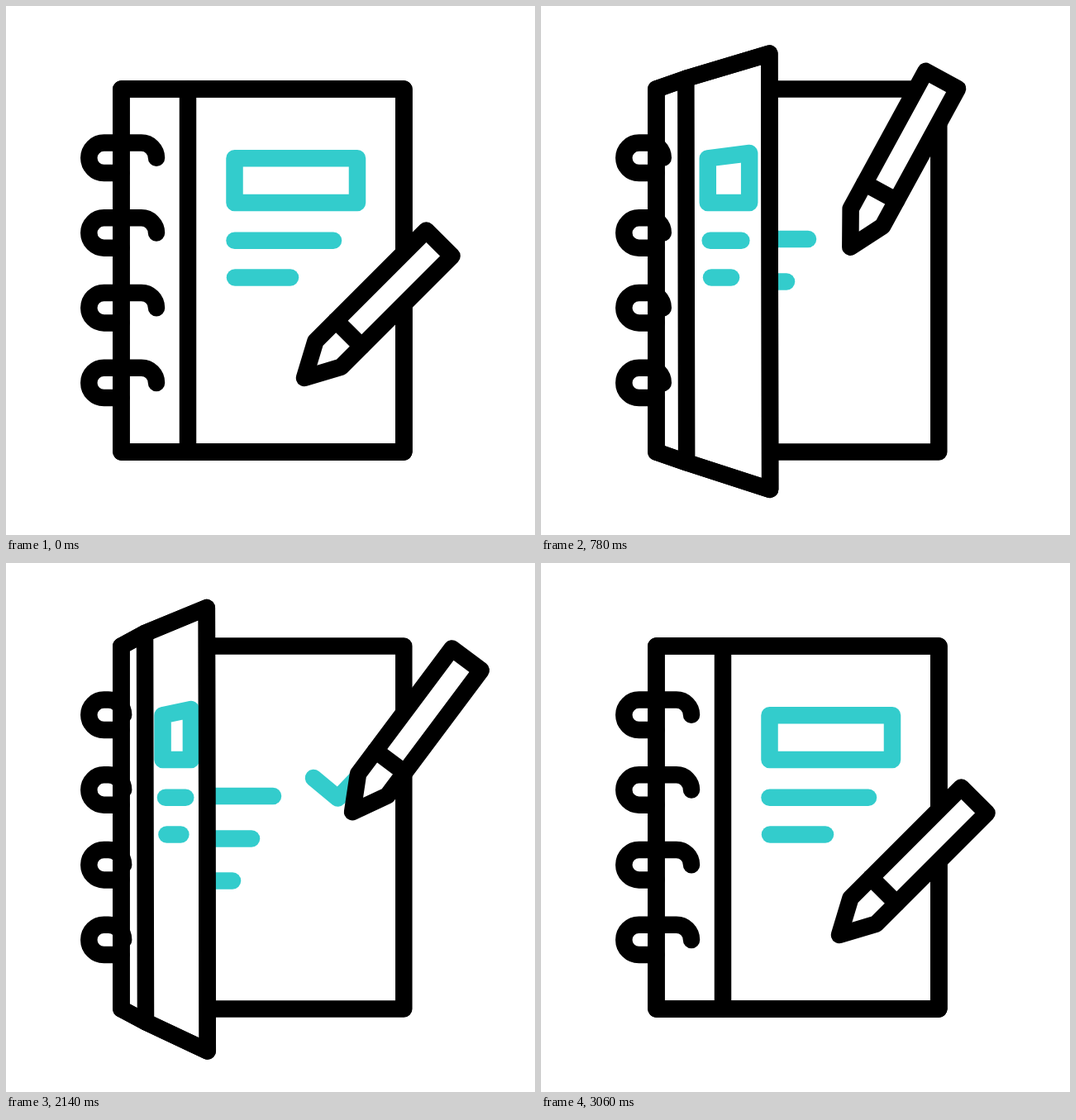
An HTML page with a canvas that plays this animation: 640 by 640 pixels, repeating every 3.6 s.

```html
<!DOCTYPE html>
<html lang="en">
<head>
<meta charset="utf-8">
<title>Notebook</title>
<style>
html, body { margin: 0; width: 100%; height: 100%; overflow: hidden; background: #fff; }
canvas { display: block; width: 100vw; height: 100vh; }
</style>
</head>
<body>
<canvas id="stage" width="640" height="640"></canvas>
<script>
const ctx = document.getElementById('stage').getContext('2d');
const LOOP = 3600, TEAL = '#33cccc', BLACK = '#000';

const lerp = (a, b, k) => a + (b - a) * k;
const mix = (a, b, k) => a.map((v, i) => lerp(v, b[i], k));
const ease = (t, from, to) => {
  const s = Math.min(1, Math.max(0, (t - from) / (to - from)));
  return s * s * (3 - 2 * s);
};

// How far the cover is open: [time, amount], joined by a smooth curve
const OPENING = [
  [213, 0], [540, .493], [740, .79], [1010, 1], [2030, 1],
  [2140, .972], [2360, .81], [2740, .293], [2900, .1], [3040, 0]
];

function slope(keys, i) {
  const a = keys[i - 1], b = keys[i], c = keys[i + 1];
  if (!a || !c || (b[1] - a[1]) * (c[1] - b[1]) <= 0) return 0;
  return (c[1] - a[1]) / (c[0] - a[0]);
}

function follow(keys, t) {
  if (t <= keys[0][0]) return keys[0][1];
  const i = keys.findIndex(k => k[0] > t) - 1;
  if (i < 0) return keys[keys.length - 1][1];
  const [t0, v0] = keys[i], [t1, v1] = keys[i + 1];
  const d = t1 - t0, s = (t - t0) / d, r = 1 - s;
  return v0 * r * r * (1 + 2 * s) + v1 * s * s * (3 - 2 * s)
    + d * s * r * (slope(keys, i) * r - slope(keys, i + 1) * s);
}

// Point list up to fraction k of its length
function trim(points, k) {
  const dist = (a, b) => Math.hypot(b[0] - a[0], b[1] - a[1]);
  let left = k * points.slice(1).reduce((sum, p, i) => sum + dist(points[i], p), 0);
  const out = [points[0]];
  for (let i = 1; i < points.length && left > 0; i++) {
    const len = dist(points[i - 1], points[i]);
    out.push(mix(points[i - 1], points[i], Math.min(1, left / len)));
    left -= len;
  }
  return out;
}

function draw(points, color, closed, fill) {
  ctx.beginPath();
  points.forEach(p => ctx.lineTo(p[0], p[1]));
  if (closed) ctx.closePath();
  if (fill) {
    ctx.fillStyle = '#fff';
    ctx.fill();
  }
  ctx.strokeStyle = color;
  ctx.stroke();
}

const bar = (x0, x1, y) => draw([[x0, y], [x1, y]], TEAL);

const CHECK = [[372, 260], [401.5, 284.5], [442, 242]];

function page(t) {
  draw([[139.5, 100.5], [481.3, 100.5], [481.3, 539.5], [139.5, 539.5]], BLACK, true, true);
  bar(230, 323, 282);
  bar(230, 297, 333.5);
  bar(230, 274, 384.5);
  const k = ease(t, 1090, 1610);
  if (k > 0) draw(trim(CHECK, k), TEAL);
}

function cover(t) {
  // The lower edge trails the rest a little
  const p = follow(OPENING, t), low = follow(OPENING, t - 20);
  const right = 481.3 - 245.5 * p, spine = 220 - 53.5 * p;
  const top = 100.5 - 47 * p * (1.57 - .57 * p);
  const bottom = 539.5 + 51.5 * low * (1.45 - .45 * low);
  const k = (spine - 139.5) / (right - 139.5), bend = 3 * p ** 4;
  const head = [spine, lerp(100.5, top, k) - bend];
  const foot = [spine + p, lerp(539.5, bottom, k) + bend * .6];
  const outline = [[139.5, 100.5], head, [right, top], [right + p, bottom], foot, [139.5, 539.5]];

  draw(outline, BLACK, true, true);
  const x0 = 276.5 - 89.5 * p, x1 = 425 - 207 * p;
  draw([[x0, 184.3], [x1, 184.3 - 7.5 * p], [x1, 238], [x0, 238]], TEAL, true);
  bar(276.5 - 86 * p, 396 - 184 * p, 283.7);
  bar(277 - 85 * p, 344 - 136.5 * p, 328.5);
  draw(outline, BLACK, true);
  draw([head, foot], BLACK);

  const end = 182 - 41 * p;
  for (let i = 0; i < 4; i++) {
    const y = 183.8 + 90.7 * i;
    ctx.beginPath();
    ctx.moveTo(139.5, y + 18.2);
    ctx.arc(118.5, y, 18.2, Math.PI / 2, Math.PI * 1.5);
    ctx.arc(end - 18.2, y, 18.2, -Math.PI / 2, 0);
    ctx.stroke();
  }
}

function penTip(t) {
  const rest = [361, 450], write = [[378, 248], [409, 267], [453.7, 218]];
  if (t < 1090) return mix(rest, write[0], ease(t, 213, 1025));
  if (t < 1605) return trim(write, ease(t, 1090, 1605)).pop();
  const k = ease(t, 1605, 2930), [x, y] = mix(write[2], rest, k);
  return [x - 6 * k * (1 - k), y];
}

function pen(t) {
  const angle = 45 - 20.9 * (ease(t, 213, 1025) - ease(t, 1025, 2975));
  ctx.save();
  ctx.translate(...penTip(t));
  ctx.rotate(angle * Math.PI / 180);
  draw([[0, 0], [-22, -41], [-22, -230.5], [22, -230.5], [22, -41]], BLACK, true, true);
  draw([[-22, -76], [22, -76]], BLACK);
  ctx.restore();
}

function frame(now) {
  const t = now % LOOP;
  ctx.clearRect(0, 0, 640, 640);
  ctx.lineWidth = 20.5;
  ctx.lineCap = ctx.lineJoin = 'round';
  page(t);
  // The cover passes over the pen only while it swings open
  const covered = t > 420 && t < 1300;
  if (covered) pen(t);
  cover(t);
  if (!covered) pen(t);
}

const start = performance.now();
function tick() {
  frame(performance.now() - start);
  requestAnimationFrame(tick);
}
tick();
</script>
</body>
</html>
```
